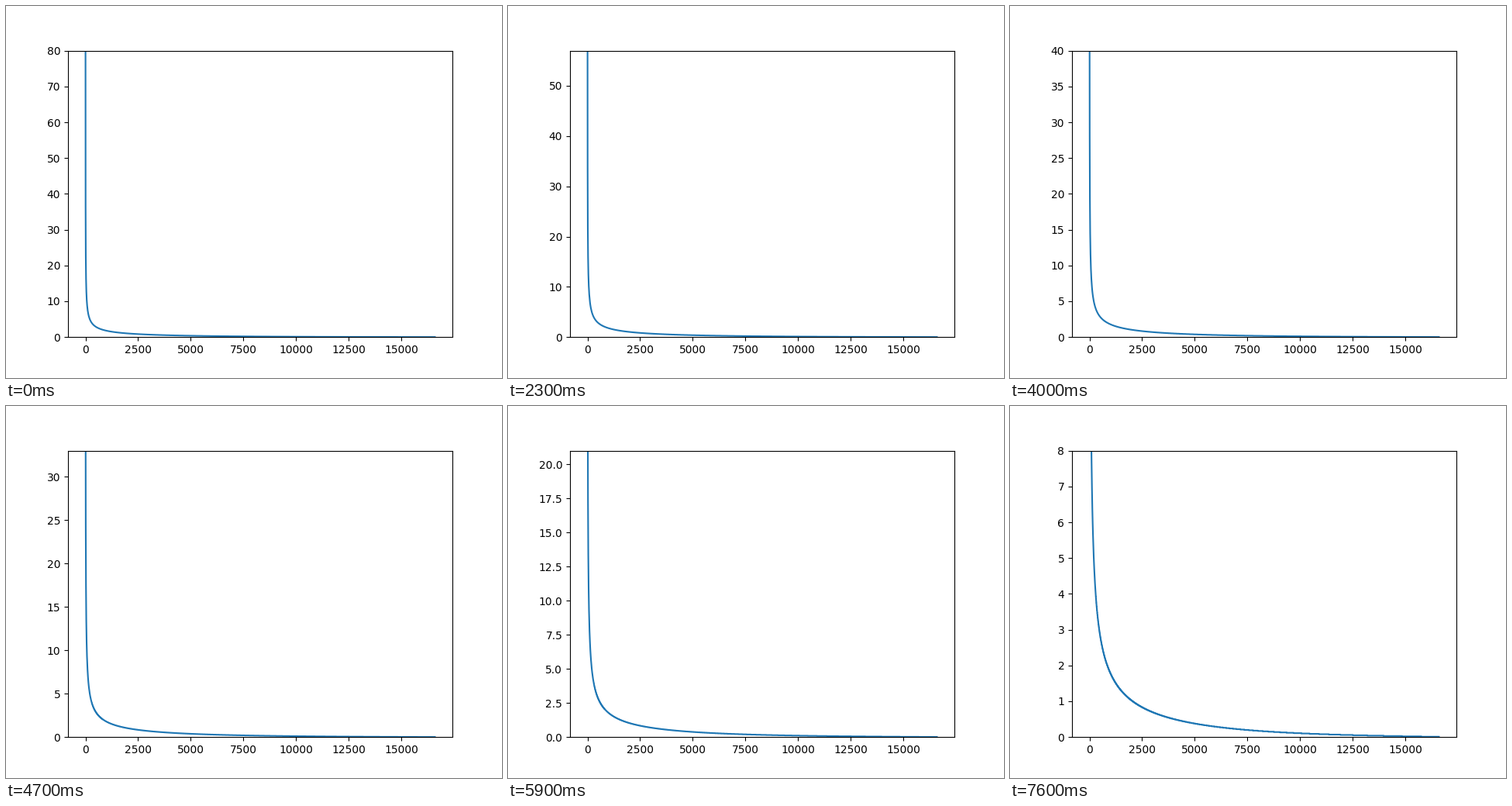
These frames come from a looping animation (640 by 480 pixels, 8 s). A matplotlib script:

```python
import numpy as np
import matplotlib.pyplot as plt
from matplotlib.animation import FuncAnimation

COUNT = 16598
FRAMES = 80


def ranked_values(count):
    """Power law with an exponential cut-off, in steps of 0.01."""
    rank = np.arange(1, count + 1)
    tail = np.exp(-rank / 8600) * np.sqrt(1 - rank / (count + 1))
    return np.maximum(np.round(113 * rank ** -0.58 * tail, 2), 0.01)


def top_limit(frame):
    """One unit per frame down to 10, then two slower steps."""
    if frame < 72:
        return max(80 - frame, 10)
    return 9 if frame < 76 else 8


fig, ax = plt.subplots(figsize=(6.4, 4.8), dpi=100)
ax.plot(ranked_values(COUNT))


def update(frame):
    ax.set_ylim(0, top_limit(frame))
    return ax.lines


update(0)
anim = FuncAnimation(fig, update, frames=FRAMES, interval=100,
                     repeat=True, repeat_delay=0, blit=False)
plt.show()
```
